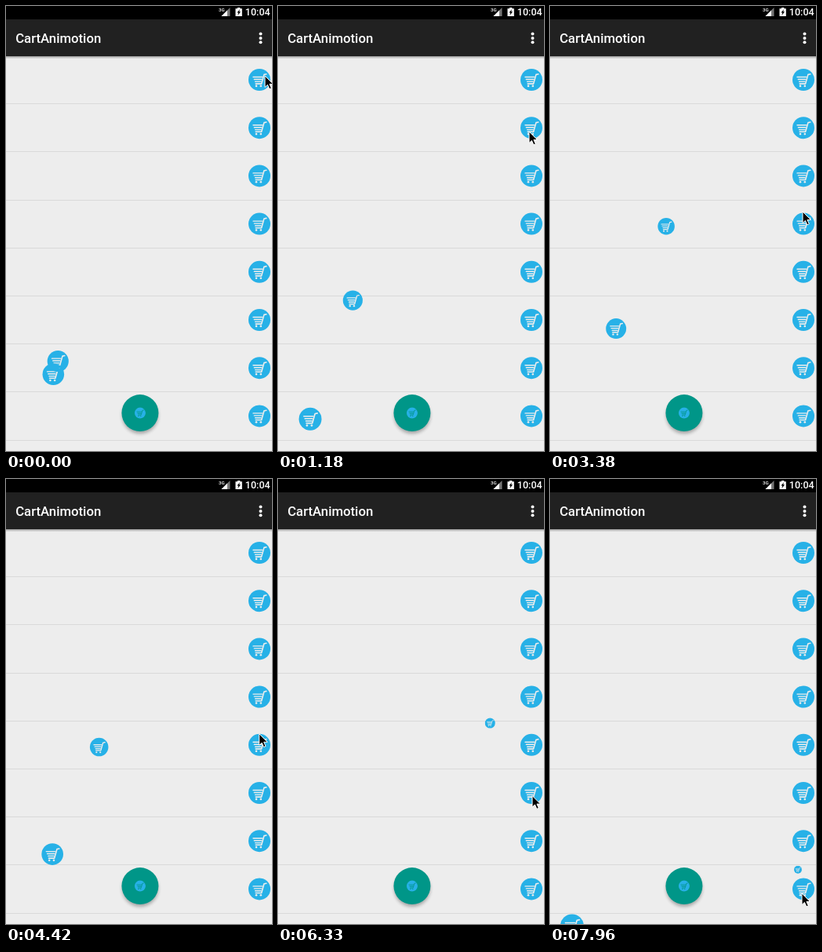
Recreate the animation shown at these times as an HTML page. Size 339 by 567 pixels, loop 8000 ms.

```html
<!DOCTYPE html>
<html lang="en">
<head>
<meta charset="utf-8">
<title>CartAnimotion</title>
<style>
html, body { margin: 0; width: 100%; height: 100%; overflow: hidden; background: #ededed; }
svg { display: block; width: 100vw; height: 100vh; }
text { font-family: Roboto, sans-serif; font-weight: 500; fill: #fff; }
</style>
</head>
<body>
<svg viewBox="0 0 339 567">
  <defs>
    <!-- The trolley is a hole in the disc, so whatever lies below shows through -->
    <mask id="hole" maskUnits="userSpaceOnUse" x="-15" y="-15" width="30" height="30">
      <rect x="-15" y="-15" width="30" height="30" fill="#fff"/>
      <g fill="none" stroke="#000" stroke-linecap="round" stroke-linejoin="round">
        <path d="M8.8 -7.2L5.9 -6.6L2.6 5.1H-4.8" stroke-width="1.6"/>
        <path d="M-8 -3.5H3.6M-6.7 -.5H2.8M-5.4 2.4H2" stroke-width="1.4"/>
      </g>
      <circle cx="-4" cy="7.9" r="1.3"/><circle cx="1.8" cy="7.9" r="1.3"/>
    </mask>
    <g id="cart"><circle r="14" fill="#27b1e7" mask="url(#hole)"/></g>
    <linearGradient id="shade" x2="0" y2="1">
      <stop stop-color="#000" stop-opacity=".32"/>
      <stop offset="1" stop-color="#000" stop-opacity="0"/>
    </linearGradient>
    <filter id="blur" x="-30%" y="-30%" width="160%" height="160%"><feGaussianBlur stdDeviation="2"/></filter>
  </defs>

  <rect width="339" height="567" fill="#ededed"/>
  <g id="rows"></g>

  <rect y="64" width="339" height="3.5" fill="url(#shade)"/>
  <rect width="339" height="64" fill="#212121"/>
  <rect width="339" height="17" fill="#000"/>
  <text x="12.2" y="47" font-size="16.75">CartAnimotion</text>
  <text x="336.6" y="12" font-size="12.5" text-anchor="end">10:04</text>
  <text x="271" y="7" font-size="6.2">3G</text>
  <path d="M285.5 2V13H274.5Z" fill="#777"/>
  <path d="M282 5.5V13H274.5Z" fill="#fff"/>
  <path d="M292.5 3.2H295V2H298.4V3.2H300.8V13H292.5Z" fill="#fff"/>
  <path d="M298 4.2L294.4 8.4H296.2L295.4 12L299.1 7.3H297.2Z" fill="#000"/>
  <g fill="#fff">
    <circle cx="324.5" cy="35.5" r="2"/><circle cx="324.5" cy="40.9" r="2"/><circle cx="324.5" cy="46.3" r="2"/>
  </g>

  <circle cx="171" cy="522" r="23" opacity=".3" filter="url(#blur)"/>
  <circle cx="170.9" cy="518.6" r="23.5" fill="#009688"/>
  <use href="#cart" transform="translate(170.9 518.6) scale(.5)"/>

  <g id="flying"></g>
  <path id="cursor" d="M0 0V14.5L3.4 11.4L5.8 16.8L8.3 15.7L5.9 10.5H10.5Z" stroke="#fff"/>
</svg>
<script>
const LOOP = 8000, STEP = 146.9, FLIGHT = 1400, TAP_GAP = 182;
const byId = id => document.getElementById(id);
const rowY = row => 94 + 61.2 * row;

function add(parent, tag, attrs) {
  const el = document.createElementNS('http://www.w3.org/2000/svg', tag);
  for (const name in attrs) el.setAttribute(name, attrs[name]);
  return parent.appendChild(el);
}

// One visit of the pointer per row
const visits = [
  { tap: 89, taps: 2, x: 330, y: 89 },
  { tap: 1245, taps: 3, x: 320, y: 160 },
  { tap: 2441, taps: 2, x: 321, y: 206 },
  { tap: 3388, taps: 2, x: 322, y: 262 },
  { tap: 4747, taps: 2, x: 323, y: 350 },
  { tap: 5925, taps: 1, x: 324, y: 402 },
  { tap: 6790, taps: 1, x: 325, y: 459 },
  { tap: 7770, taps: 1, x: 321, y: 528 }
];
const carts = [];

function launch(row, start, taps, gap = TAP_GAP) {
  for (let i = taps - 1; i >= 0; i--)
    carts.push({ row, start: start + i * gap, el: add(byId('flying'), 'use', { href: '#cart' }) });
}

launch(0, -1015, 2, 20); // already under way when the loop begins
visits.forEach(({ tap, taps }, row) => {
  add(byId('rows'), 'rect', { y: Math.round(rowY(row) + 30.2), width: 339, height: 1, fill: '#d9d9d9' });
  add(byId('rows'), 'use', { href: '#cart', x: 323, y: rowY(row) });
  launch(row, tap, taps);
});

const clamp = k => Math.min(1, Math.max(0, k));
const ease = k => (1 - Math.cos(Math.PI * k)) / 2;
const bezier = (a, b, c, t) => (1 - t) ** 2 * a + 2 * t * (1 - t) * b + t * t * c;

// The pointer reaches each row shortly before its first tap
function pointerAt(time) {
  return visits.reduce((from, to) => {
    const k = ease(clamp((time - to.tap + 500) / 250));
    return { x: from.x + (to.x - from.x) * k, y: from.y + (to.y - from.y) * k };
  });
}

function drawCart({ row, start, el }, time) {
  const s = (time - start) / FLIGHT;
  const t = ease(clamp(s));
  const x = bezier(326, 174, 0, t), y = bezier(rowY(row) + 5, 60, 660, t);
  const radius = 4.7 + (323 - x) * .0346;
  el.setAttribute('visibility', s >= 0 && s < 1 ? 'visible' : 'hidden');
  el.setAttribute('transform', `translate(${x} ${y}) scale(${radius / 14})`);
}

function draw(time) {
  for (const cart of carts) drawCart(cart, time);
  const { x, y } = pointerAt(time);
  byId('cursor').setAttribute('transform', `translate(${x} ${y})`);
}

// The picture advances in even steps
function tick() {
  const time = performance.now() % LOOP;
  draw(Math.floor(time / STEP) * STEP);
  requestAnimationFrame(tick);
}
tick();
</script>
</body>
</html>
```
